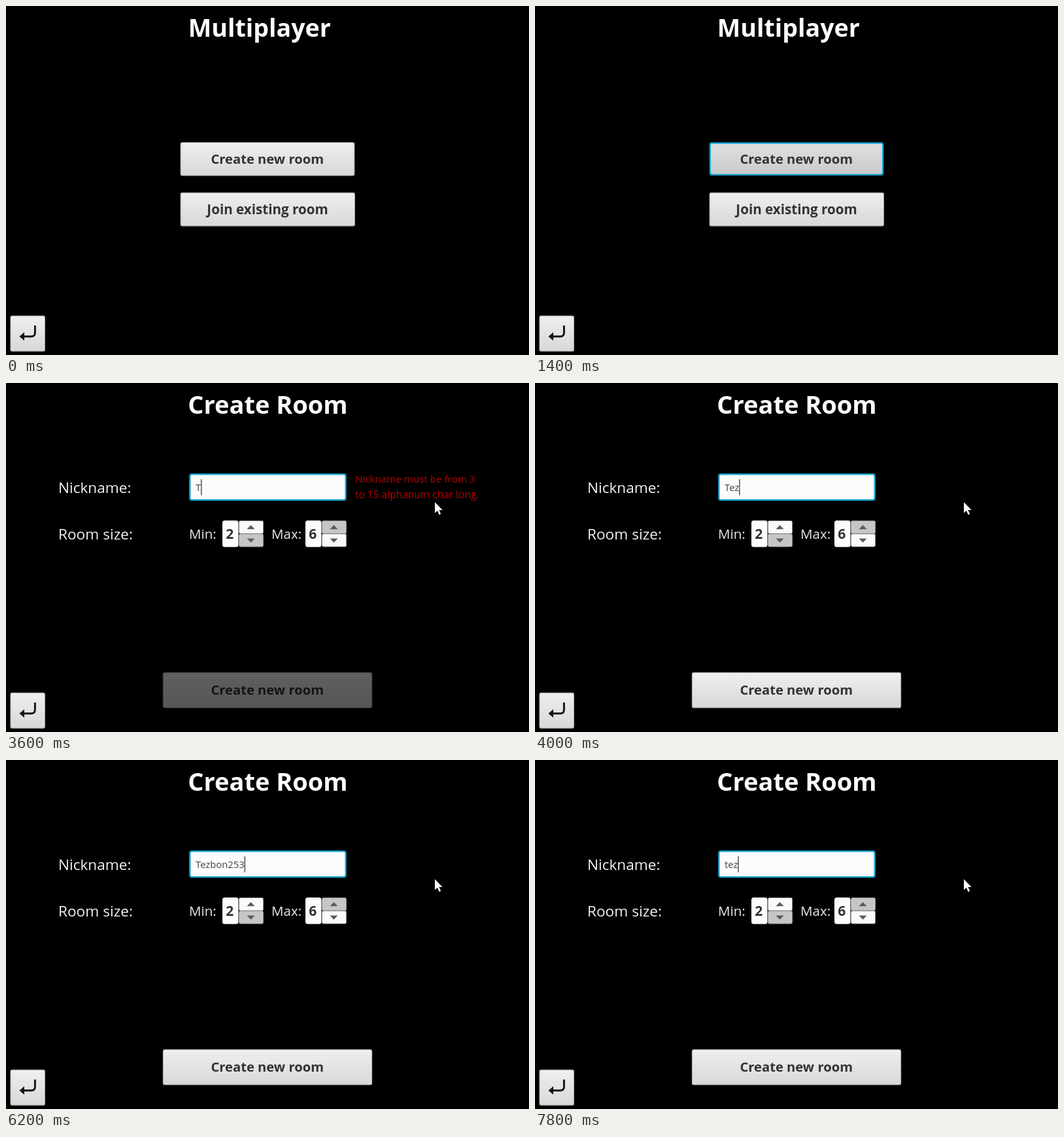
An HTML page for the animation above (8000 ms loop, 800 by 533 pixels).

```html
<!DOCTYPE html>
<html lang="en">
<head>
<meta charset="utf-8">
<title>Create Room</title>
<style>
  html, body { margin: 0; width: 100%; height: 100%; overflow: hidden; background: #000; }
  svg { display: block; width: 100%; height: 100%; }
  text { font-family: "Open Sans", "Noto Sans", sans-serif; white-space: pre; }
  .b { font-weight: 700; }
  .m { text-anchor: middle; }
</style>
</head>
<body>
<svg id="stage" viewBox="0 0 800 533"></svg>
<script>
const LOOP = 8000, STEP = 200;
const SCENE = 1600;
const NICK = 'Tezbon253';

// [time, text, caret shown, text selected]
const typing = [
  [1600, '', 1], [2400, '', 0], [2800, '', 1], [3400, '', 0],
  [3600, NICK.slice(0, 1), 1], [3800, NICK.slice(0, 2), 1], [4000, NICK.slice(0, 3), 1],
  [4200, NICK.slice(0, 4), 1], [4400, NICK.slice(0, 5), 1], [4800, NICK.slice(0, 6), 1],
  [5000, NICK.slice(0, 8), 1], [5200, NICK, 1], [5800, NICK, 0], [6200, NICK, 1],
  [6400, NICK, 1, 1], [6800, '', 1],
  [7000, 't', 1], [7600, 'te', 1], [7800, 'tez', 1]
];

const label = (x, y, size, str, fill, cls = '') =>
  `<text x="${x}" y="${y}" font-size="${size}" fill="${fill}" class="${cls}">${str}</text>`;

const box = (x, y, w, h, attrs) =>
  `<rect x="${x}" y="${y}" width="${w}" height="${h}" ${attrs}/>`;

const face = (x, y, w, h) =>
  box(x, y, w, h, 'rx="3" fill="#a3a2a4"') +
  box(x + 1, y + 1, w - 2, h - 2, 'rx="2.2" fill="url(#face)"');

// Blue focus border with a dim outer edge
const focused = (x, y, w, h, fill) =>
  box(x - 1, y - 1, w + 2, h + 2, 'rx="4" fill="#0b5f78"') +
  box(x + .5, y + .5, w - 1, h - 1, `rx="3" fill="${fill}" stroke="#16a9d3" stroke-width="2"`);

const caption = (x, y, w, h, str, size = 20.2) =>
  label(x + w / 2 - .3, y + h / 2 + 7.3, size, str, '#333', 'b m');

const button = (x, y, w, h, str, size) => face(x, y, w, h) + caption(x, y, w, h, str, size);

function spinner(x, value, upOff) {
  const ax = x + 25, c = ax + 18.5;
  const half = (y, off) => box(ax + .5, y, 37, 19.5, `rx="2" fill="${off ? '#c6c5c7' : '#fafafa'}" stroke="#8f8f90"`);
  return box(x, 210, 24.5, 40.5, 'rx="3.5" fill="#fdfdfd"') +
    half(210.5, upOff) + half(230.5, !upOff) +
    `<path d="M${c - 6} 223.3l6-6.3 6 6.3zM${c - 6} 237.5h12l-6 6.3z" fill="#5b5b5c"/>` +
    label(x + 11.3, 238, 21, value, '#333', 'b m');
}

const gradient = (id, a, b) =>
  `<linearGradient id="${id}" x2="0" y2="1"><stop stop-color="${a}"/><stop offset="1" stop-color="${b}"/></linearGradient>`;

const stage = document.getElementById('stage');
stage.innerHTML = `
  <defs>
    ${gradient('face', '#efeef0', '#d8d7da')}
    ${gradient('press', '#e0dfe1', '#cac9cb')}
  </defs>
  <rect width="800" height="533"/>
  <g id="menu">
    ${label(387.8, 46.8, 37.6, 'Multiplayer', '#fff', 'b m')}
    <g id="idle">${face(266.6, 208, 266.8, 51.6)}</g>
    <g id="pressed">${focused(267.5, 209, 265, 49, 'url(#press)')}</g>
    ${caption(267, 208, 266, 51.5, 'Create new room')}
    ${button(266.6, 284.8, 267.4, 51.6, 'Join existing room', 20.6)}
  </g>
  <g id="form">
    ${label(400.5, 46.8, 38, 'Create Room', '#fff', 'b m')}
    ${label(80, 167.5, 22.6, 'Nickname:', '#f2f2f2')}
    ${label(80, 239, 22.6, 'Room size:', '#f2f2f2')}
    ${focused(281, 139, 239, 40, '#fcfcff')}
    <rect id="mark" x="290" y="147" height="25" fill="#0096c9"/>
    <text id="nick" x="290" y="165" font-size="14.8"></text>
    <rect id="caret" y="147" width="1.3" height="24.5" fill="#3a3a3a"/>
    ${label(280, 238, 20.5, 'Min:', '#e8e8e8')}
    ${spinner(331, 2, false)}
    ${label(406, 238, 20.5, 'Max:', '#e8e8e8')}
    ${spinner(458, 6, true)}
    <g id="error">
      ${label(534, 151.5, 15.2, 'Nickname must be from 3', '#b80000')}
      ${label(534, 176, 15.5, 'to 15 alphanum char long.', '#b80000')}
    </g>
    <g id="submit">${button(239.8, 441.8, 320.4, 54.6, 'Create new room')}</g>
  </g>
  ${face(6.4, 472.8, 53.6, 55)}
  <path d="M44.4 488v11q0 5.7-5.7 5.7h-13" fill="none" stroke="#141414" stroke-width="2.9"/>
  <path d="M20.5 504.7l7.5-6.4v12.8z" fill="#141414"/>
  <path id="cursor" d="M0 0v16.5l3.8-3.6 2.8 6.3 2.6-1.2-2.8-6h5.2z" fill="#fff"/>`;

const el = {};
stage.querySelectorAll('[id]').forEach(n => el[n.id] = n);
const show = (node, on) => node.setAttribute('display', on ? 'inline' : 'none');
const set = (node, attrs) => Object.entries(attrs).forEach(([k, v]) => node.setAttribute(k, v));

function drawMenu(t) {
  const pressed = t >= 1000;
  show(el.idle, !pressed);
  show(el.pressed, pressed);
}

function drawForm(t) {
  const [, text, caret, selected] = typing.filter(s => s[0] <= t).pop();
  el.nick.textContent = text;
  set(el.nick, { fill: selected ? '#fff' : '#454545' });
  const w = text ? el.nick.getComputedTextLength() : 0;
  set(el.mark, { width: selected ? w : 0 });
  set(el.caret, { x: 290 + w });
  show(el.caret, caret);

  const valid = text.length >= 3;
  set(el.submit, { opacity: valid ? 1 : .4 });
  show(el.error, !valid && t >= 3600);

  const p = Math.min(1, Math.max(0, (t - 2000) / 600));
  const k = 1 - (1 - p) ** 2;
  set(el.cursor, { transform: `translate(${420 + 236 * k} ${217 - 35 * k})` });
}

function draw(time) {
  const t = Math.floor(time % LOOP / STEP) * STEP;
  const form = t >= SCENE;
  show(el.menu, !form);
  show(el.form, form);
  show(el.cursor, t >= 2000);
  form ? drawForm(t) : drawMenu(t);
}

const start = performance.now();
function tick() {
  draw(performance.now() - start);
  requestAnimationFrame(tick);
}
tick();
</script>
</body>
</html>
```
